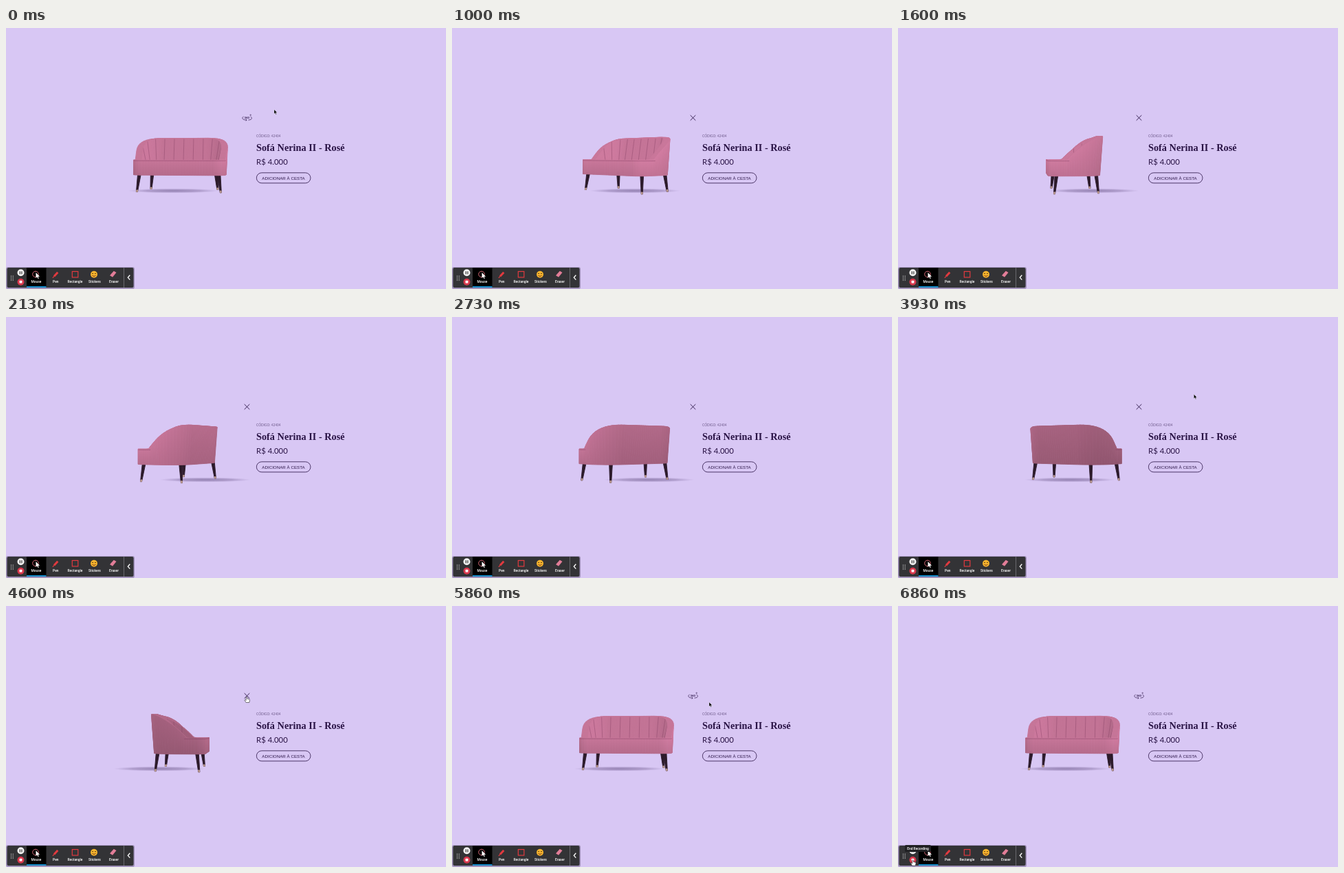
Write an HTML page with a canvas that moves like this. It is 640 by 380 pixels and loops after 6930 ms.

```html
<!DOCTYPE html>
<html lang="pt">
<head>
<meta charset="utf-8">
<title>Sofá 360</title>
<style>
  html, body { margin: 0; width: 100%; height: 100%; overflow: hidden; background: #d8c7f4; }
  canvas, svg { position: absolute; left: 0; top: 0; width: 640px; height: 380px; }
  .ink { fill: none; stroke: #2a1446; }
  .copy { fill: #2a1446; }
  .lato { font-family: Lato, sans-serif; }
  .tool { font: 500 4.9px Roboto, sans-serif; fill: #fff; text-anchor: middle; }
</style>
</head>
<body>
<canvas id="stage"></canvas>
<svg viewBox="0 0 640 380">
  <g class="copy">
    <text class="lato" x="364" y="158.7" font-size="4.8" opacity=".6">CÓDIGO: 42404</text>
    <text x="364" y="179" font-size="14.3" font-weight="700" font-family="'Liberation Serif', serif">Sofá Nerina II - Rosé</text>
    <text class="lato" x="364" y="199" font-size="11.4">R$ 4.000</text>
    <text x="403.5" y="220.6" font-size="6.23" text-anchor="middle" font-family="'Liberation Sans', sans-serif">ADICIONAR À CESTA</text>
  </g>
  <rect class="ink" x="364.4" y="210.8" width="78.6" height="15" rx="7.5" stroke-width=".8"/>

  <g id="spin">
    <path class="ink" stroke-width=".7" d="M345.5 129C342.500 130.500 343.500 134 350 134M352.500 134C358.500 133.500 358.500 130.500 355.500 129M348.800 132.800L350.200 134L348.800 135.300"/>
    <text class="copy lato" x="350.200" y="131.600" font-size="4.300" font-weight="700" text-anchor="middle">360</text>
    <circle class="ink" cx="355.700" cy="126.700" r=".7" stroke-width=".6"/>
  </g>
  <path id="close" class="ink" stroke-width=".9" d="M346.700 127L354.300 134.600M354.300 127L346.700 134.600"/>

  <!-- recorder toolbar -->
  <rect x="0" y="348" width="187" height="32" rx="3" fill="#221a33" opacity=".3"/>
  <rect x="1.500" y="349" width="184" height="29" rx="2" fill="#333336"/>
  <path d="M171.500 349V378" stroke="#77777c" stroke-width=".8"/>
  <path d="M180.300 359.800L177.300 363.200L180.300 366.600" fill="none" stroke="#fff" stroke-width="1.300"/>
  <path d="M7.500 360.500V368M10.300 360.500V368" stroke="#aaa" stroke-width="1.200" stroke-dasharray="1.200 .9"/>
  <circle cx="21.500" cy="356.300" r="5" fill="#f4f4f4"/>
  <path d="M20.300 354.200V358.400M22.900 354.200V358.400" stroke="#333" stroke-width="1.200"/>
  <circle cx="21.500" cy="369.700" r="5" fill="#d8374c"/>
  <rect x="19.600" y="367.800" width="3.800" height="3.800" rx=".5" fill="#fff"/>
  <rect x="30" y="349" width="28.500" height="29" fill="#000"/>
  <rect x="30" y="376" width="28.500" height="1.800" fill="#189be0"/>
  <circle cx="43" cy="358.500" r="4.300" fill="none" stroke="#d96a78" stroke-width="1"/>
  <path d="M43.500 356V364L45.300 362.300L46.600 365L47.800 364.400L46.500 361.900H49Z" fill="#fff"/>
  <g fill="none" stroke="#e23a3f">
    <path d="M70 361.500L75.300 355.800" stroke-width="3"/>
    <path d="M67.800 363.800L70 361.500" stroke-width="1.200"/>
    <rect x="96.300" y="354.500" width="8.500" height="8.500" stroke-width="1.200"/>
  </g>
  <circle cx="128" cy="358.800" r="5" fill="#f5b32d"/>
  <path d="M125.200 357.500H127M129 357.500H130.800" stroke="#5b3a12" stroke-width="1.200"/>
  <path d="M125.500 360.500Q128 362.500 130.500 360.500" fill="none" stroke="#7a3b20" stroke-width="1"/>
  <path d="M151 360.300L156.800 353.800L160.500 356.100L155 362.800Z" fill="#e27d98"/>
  <g class="tool">
    <text x="44" y="371.300">Mouse</text><text x="72.300" y="371.300">Pen</text>
    <text x="100.500" y="371.300">Rectangle</text><text x="129" y="371.300">Stickers</text>
    <text x="157" y="371.300">Eraser</text>
  </g>
  <g id="tip">
    <rect x="10" y="348" width="38" height="10" rx="1.500" fill="#202023"/>
    <text class="tool" x="29" y="354.700">End Recording</text>
  </g>

  <g id="pointer">
    <path id="arrow" transform="scale(.88)" d="M0 0V7.200L1.700 5.700L2.800 8.200L3.900 7.700L2.800 5.300H5Z" fill="#000" stroke="#fff" stroke-width=".4"/>
    <path id="hand" d="M-.8 .6Q0 -.4 .8 .6V3L3.900 3.700Q4.800 4.200 4.500 5.500L3.800 8.500H-.8L-3 5.300Q-2.800 4.300-1.700 4.800L-.8 5.500Z" fill="#fff" stroke="#222" stroke-width=".6"/>
    <path id="beam" d="M-1.300-4H1.300M0-4V4" stroke="#efe6fb" stroke-width=".7" fill="none"/>
  </g>
</svg>
<script>
const LOOP = 6930, OPEN = 600, CLOSE = 5600, REST = 8;
const EYE = 187, FAR = 700, GROUND = 50, BASE = 26, SEAT = 5, RISE = 32.5;
const el = id => document.getElementById(id);
const clamp = (x, a = 0, b = 1) => Math.min(b, Math.max(a, x));

// [time, value...] keys
const TURN = [[OPEN, REST], [1000, 46], [2130, 120], [3400, 168], [4600, 276], [CLOSE, 360 + REST]];
const PATH = [[0, 390, 118.700], [60, 390, 120], [460, 350, 131], [620, 350, 131], [780, 410, 150],
  [960, 474, 171], [3600, 474, 171], [3950, 430, 112], [4260, 381, 110], [4500, 350, 132],
  [5660, 350, 132], [5860, 374, 140], [5950, 398, 150], [6130, 320, 162], [6330, 320, 162],
  [6720, 30, 364], [6800, 21.500, 369.500]];

function sample(keys, t, ease = x => x) {
  if (t <= keys[0][0]) return keys[0].slice(1);
  const i = keys.findIndex(k => k[0] > t);
  if (i < 0) return keys[keys.length - 1].slice(1);
  const a = keys[i - 1], b = keys[i], k = ease((t - a[0]) / (b[0] - a[0]));
  return a.slice(1).map((v, j) => v + (b[j + 1] - v) * k);
}

// Rounded footprint: u across, v to the front, with outward normals; starts at the middle of the back
function footprint() {
  const arcs = [[50, 23, 15], [-50, 23, 15], [-33, -2, 32], [33, -2, 32]];
  const corners = [];
  arcs.forEach(([cu, cv, r], q) => {
    for (let i = 0; i <= 12; i++) {
      const a = (q + i / 12) * Math.PI / 2, nu = Math.cos(a), nv = Math.sin(a);
      corners.push({ u: cu + r * nu, v: cv + r * nv, nu, nv });
    }
  });
  const out = [];
  corners.forEach((p, i) => {
    const q = corners[(i + 1) % corners.length];
    const len = Math.hypot(q.u - p.u, q.v - p.v), n = len > 6 ? 2 * Math.ceil(len / 8) : 1;
    for (let k = 0; k < n; k++) out.push({ ...p, u: p.u + (q.u - p.u) * k / n, v: p.v + (q.v - p.v) * k / n });
  });
  const mid = out.findIndex(p => p.v < -30 && Math.abs(p.u) < 1);
  return [...out.slice(mid), ...out.slice(0, mid)];
}
const EDGE = footprint();
const rise = v => 1 - (1 - clamp((14 - v) / 48)) ** 1.5;

const canvas = el("stage"), ctx = canvas.getContext("2d");
const dpr = window.devicePixelRatio || 1;
canvas.width = 640 * dpr;
canvas.height = 380 * dpr;

function fill(points, paint) {
  ctx.beginPath();
  points.forEach(p => ctx.lineTo(p[0], p[1]));
  ctx.closePath();
  ctx.fillStyle = ctx.strokeStyle = paint;
  ctx.lineWidth = .9;
  ctx.fill();
  ctx.stroke();
}
function line(points, paint, width) {
  ctx.beginPath();
  points.forEach(p => ctx.lineTo(p[0], p[1]));
  ctx.strokeStyle = paint;
  ctx.lineWidth = width;
  ctx.stroke();
}

function drawShadow(s, c) {
  ctx.save();
  ctx.translate(255 + 31 * s - 16 * c, 237);
  ctx.scale(66, 3.4);
  const g = ctx.createRadialGradient(0, 0, 0, 0, 0, 1);
  g.addColorStop(0, "rgba(105,85,135,.6)");
  g.addColorStop(.6, "rgba(115,95,145,.4)");
  g.addColorStop(1, "rgba(130,110,165,0)");
  ctx.fillStyle = g;
  ctx.fillRect(-1, -1, 2, 2);
  ctx.restore();
}

function drawLegs(project) {
  const legs = [[-59, 30], [59, 30], [-51, -30], [51, -30]].map(([u, v]) => ({
    top: project(u * .95, v * .9, BASE - 2), foot: project(u, v, GROUND)
  }));
  legs.sort((a, b) => a.foot[2] - b.foot[2]).forEach(({ top, foot }) => {
    const at = (k, w) => [top[0] + (foot[0] - top[0]) * k + w, top[1] + (foot[1] - top[1]) * k];
    fill([at(0, -2.4), at(0, 2.4), at(1, 1), at(1, -1)], "#2c1a2a");
    fill([at(.9, -1), at(.9, 1), at(1, .8), at(1, -.8)], "#bf9c93");
  });
}

function drawSofa(deg) {
  const a = deg * Math.PI / 180, c = Math.cos(a), s = Math.sin(a);
  const project = (u, v, y) => {
    const z = u * s + v * c, k = FAR / (FAR - z);
    return [255 + (u * c - v * s) * k, EYE + y * k, z];
  };
  const tone = (nu, nv, gain = 1) => {
    const l = gain * (1 + .05 * (s + c)) * (1 + .07 * clamp(nu + .35 * nv, -1, 1));
    return `rgb(${[176, 104, 135].map(k => Math.round(k * l))})`;
  };
  drawShadow(s, c);
  drawLegs(project);

  const ring = EDGE.map(p => {
    const r = rise(p.v), y = SEAT - RISE * r;
    const at = (out, h) => project(p.u + p.nu * out, p.v + p.nv * out, h);
    return { ...p, r, low: at(0, BASE), top: at(4 * r, y), lip: at(0, SEAT + 1),
      inTop: at(4 * r - 9, y), inLow: at(-11, SEAT + 1) };
  });
  const next = i => ring[(i + 1) % ring.length];
  const outer = ring.map((p, i) => next(i).low[0] < p.low[0]);
  const inner = ring.map((p, i) => p.r + next(i).r > 0 && next(i).inLow[0] > p.inLow[0]);

  fill(EDGE.map(p => project(p.u, p.v, SEAT)), tone(.5, .5, 1.04));
  ring.forEach((p, i) => {
    const q = next(i);
    if (inner[i]) fill([p.inLow, q.inLow, q.inTop, p.inTop], tone(-p.nu, -p.nv, 1.02));
  });
  ring.forEach((p, i) => {
    if (inner[i] && p.r > .35 && i % 4 === 0) line([p.inTop, p.inLow], "rgba(120,55,90,.45)", .8);
  });
  ring.forEach((p, i) => {
    const q = next(i);
    if (p.r + q.r > 0) fill([p.top, q.top, q.inTop, p.inTop], tone(.3, .2, 1.04));
  });
  ring.forEach((p, i) => {
    const q = next(i);
    if (!outer[i]) return;
    const g = ctx.createLinearGradient(0, p.top[1], 0, p.low[1]);
    g.addColorStop(0, tone(p.nu, p.nv, 1.04));
    g.addColorStop(1, tone(p.nu, p.nv, .95));
    fill([p.low, q.low, q.top, p.top], g);
  });
  line(ring.filter((p, i) => outer[i] && p.v > 10).map(p => p.lip), "rgba(120,55,90,.5)", .8);
}

const show = (id, on) => el(id).style.display = on ? "" : "none";

function frame(now) {
  const t = now % LOOP, open = t >= OPEN && t < CLOSE;
  ctx.setTransform(dpr, 0, 0, dpr, 0, 0);
  ctx.clearRect(0, 0, 640, 380);
  ctx.lineJoin = "round";
  drawSofa(open ? sample(TURN, t)[0] : REST);

  const [x, y] = sample(PATH, t, k => k * k * (3 - 2 * k));
  const onIcon = Math.abs(x - 350) < 8 && Math.abs(y - 131) < 7;
  const onStop = Math.hypot(x - 21.5, y - 369.7) < 6;
  const onText = x > 364 && x < 493 && y > 166 && y < 183;
  el("pointer").setAttribute("transform", `translate(${x} ${y})`);
  show("hand", onIcon || onStop);
  show("beam", onText);
  show("arrow", !onIcon && !onStop && !onText);
  show("spin", !open);
  show("close", open);
  show("tip", onStop);
  requestAnimationFrame(frame);
}
frame(0);
</script>
</body>
</html>
```
